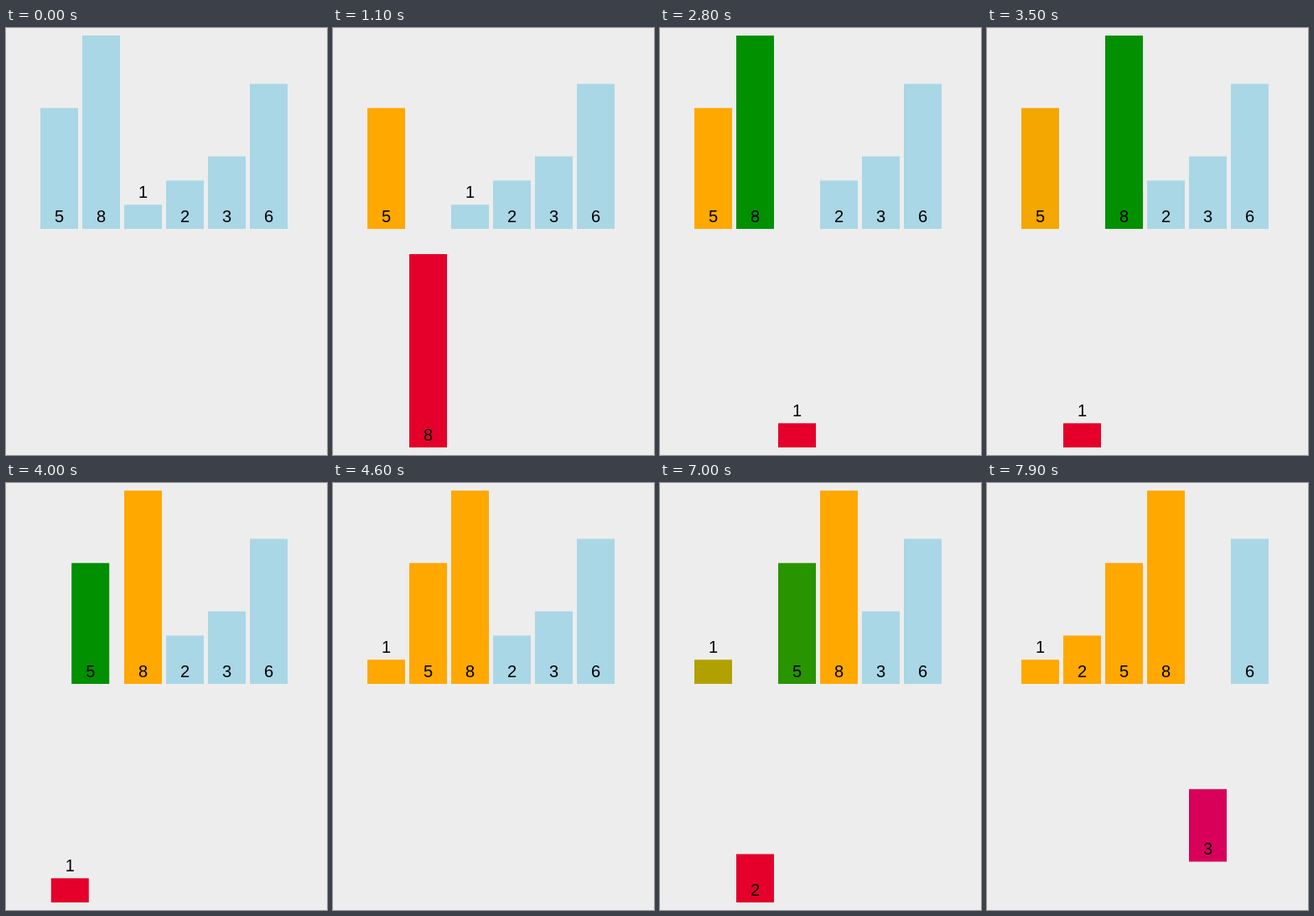
These frames come from a looping animation (383x508 px, 8 s). An HTML page:

```html
<!DOCTYPE html>
<html lang="en">
<head>
<meta charset="utf-8">
<title>Insertion sort</title>
<style>
  html, body { margin: 0; width: 100%; height: 100%; overflow: hidden; background: #ededed; }
  svg { display: block; width: 383px; height: 508px; }
  text { font: 20px "Liberation Sans", Arial, sans-serif; text-anchor: middle; }
</style>
</head>
<body>
<svg id="stage" viewBox="0 0 383 508"></svg>
<script>
const LOOP = 8000, TICK = 100, MOVE = 200, LAG = 17;
const UNIT = 28.75, BASE = 239, DROP = 260, LEFT = 41, PITCH = 50, WIDTH = 45;
const values = [5, 8, 1, 2, 3, 6];

const BLUE = [169, 215, 229], ORANGE = [255, 168, 0], GREEN = [0, 144, 0];
const RED = [228, 0, 43], MAGENTA = [217, 0, 91], MAGENTA_AT = 0.81;

// start time, bar value, changed properties
const steps = [];
const add = (at, value, change) => steps.push({ at, value, change });
const sorted = (at, value) => add(at, value, { color: ORANGE });
const extract = (at, value) => add(at, value, { color: RED, drop: 1 });
const compare = (at, value, previous) => {
  add(at, value, { color: GREEN });
  if (previous) sorted(at + LAG, previous);
};
const shift = (at, big, key, slot) => {
  add(at, big, { slot: slot + 1 });
  add(at, key, { slot });
};
const insert = (at, key, neighbour) => {
  add(at, key, { color: ORANGE, drop: 0 });
  sorted(at, neighbour);
};

sorted(426, 5);
extract(865, 8);
compare(1295, 5);
insert(1724, 8, 5);

extract(2200, 1);
compare(2600, 8);
shift(3022, 8, 1, 1);
compare(3454, 5, 8);
shift(3880, 5, 1, 0);
insert(4319, 1, 5);

extract(4752, 2);
compare(5195, 8);
shift(5600, 8, 2, 2);
compare(6040, 5, 8);
shift(6475, 5, 2, 1);
compare(6915, 1, 5);
insert(7335, 2, 1);

extract(7772, 3);

const stage = document.getElementById("stage");
const make = (tag, parent) =>
  parent.appendChild(document.createElementNS("http://www.w3.org/2000/svg", tag));
const set = (el, attrs) => {
  for (const name in attrs) el.setAttribute(name, attrs[name]);
};

const bars = values.map((value, slot) => {
  const group = make("g", stage), rect = make("rect", group), label = make("text", group);
  const height = value * UNIT, top = BASE - height;
  set(rect, { y: top, width: WIDTH, height });
  set(label, { x: WIDTH / 2, y: value === 1 ? top - 8 : BASE - 8 });
  label.textContent = value;
  return { value, slot, group, rect, moves: steps.filter(s => s.value === value) };
});

const ease = p => p < 0.5 ? 4 * p ** 3 : 1 - 4 * (1 - p) ** 3;
const lerp = (a, b, p) => a + (b - a) * p;
const blend = (a, b, p) => a.map((c, i) => lerp(c, b[i], p));

function tint(from, to, p) {
  if (to !== RED) return blend(from, to, p);
  return p < MAGENTA_AT
    ? blend(from, MAGENTA, p / MAGENTA_AT)
    : blend(MAGENTA, RED, (p - MAGENTA_AT) / (1 - MAGENTA_AT));
}

function draw(time) {
  for (const bar of bars) {
    const state = { slot: bar.slot, drop: 0, color: BLUE };
    for (const { at, change } of bar.moves) {
      if (time <= at) break;
      const p = ease(Math.min(1, (time - at) / MOVE));
      for (const key in change) {
        const mix = key === "color" ? tint : lerp;
        state[key] = mix(state[key], change[key], p);
      }
    }
    const x = LEFT + state.slot * PITCH, y = state.drop * DROP;
    set(bar.group, { transform: `translate(${x} ${y})` });
    set(bar.rect, { fill: `rgb(${state.color.map(Math.round).join(",")})` });
  }
}

// The picture advances ten times a second.
const begin = performance.now();
function frame() {
  const time = (performance.now() - begin) % LOOP;
  draw(Math.floor(time / TICK) * TICK);
  requestAnimationFrame(frame);
}
frame();
</script>
</body>
</html>
```
